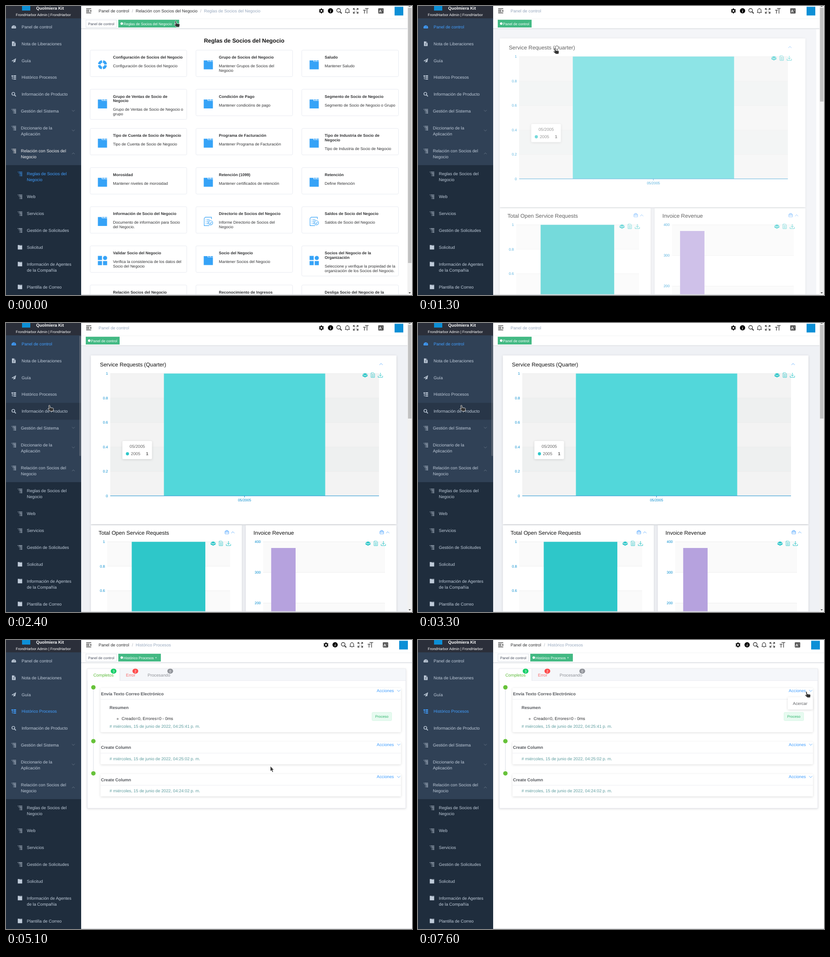
Animation of 886x632 px, one loop 8 s. Source, as an HTML page:

```html
<!DOCTYPE html>
<html lang="es">
<head>
<meta charset="utf-8">
<title>Panel</title>
<style>
html, body { margin: 0; width: 100%; height: 100%; overflow: hidden; background: #fff; }
svg { display: block; width: 886px; height: 632px; }
text { font-family: "Liberation Sans", Arial, sans-serif; text-rendering: geometricPrecision; white-space: pre; }
.item { color: #bfcbd9; }
.item.lit { color: #f4f4f5; }
.item.on { color: #409eff; }
</style>
</head>
<body>
<svg id="stage" viewBox="0 0 886 632" xmlns="http://www.w3.org/2000/svg"></svg>
<script>
const BLUE = '#409eff', SKY = '#36a3f7', AXIS = '#008acd', TEAL = '#2ec7c9';

// y is the optical middle of the line
const text = (x, y, s, fill = '#303133', size = 9.24, extra = '') =>
  `<text x="${x}" y="${y + size * .35}" fill="${fill}" font-size="${size}" ${extra}>${s}</text>`;
const bold = (x, y, s, fill, size) => text(x, y, s, fill, size, 'font-weight="700"');
const mid = (x, y, s, fill, size, extra = '') => text(x, y, s, fill, size, 'text-anchor="middle" ' + extra);
const end = (x, y, s, fill, size) => text(x, y, s, fill, size, 'text-anchor="end"');
const rect = (x, y, w, h, fill, extra = '') =>
  `<rect x="${x}" y="${y}" width="${w}" height="${h}" fill="${fill}" ${extra}/>`;
const circle = (x, y, r, fill, extra = '') => `<circle cx="${x}" cy="${y}" r="${r}" fill="${fill}" ${extra}/>`;
const shape = (d, fill = 'currentColor', extra = '') => `<path d="${d}" fill="${fill}" ${extra}/>`;
const line = (d, stroke = 'currentColor', width = 1) =>
  `<path d="${d}" fill="none" stroke="${stroke}" stroke-width="${width}"/>`;
const at = (x, y, s, extra = '') => `<g transform="translate(${x} ${y})" ${extra}>${s}</g>`;
const group = (id, s) => `<g id="${id}">${s}</g>`;
const chevron = (x, y, up, color = BLUE, w = 3.4) => {
  const h = up ? -w : w;
  return line(`M${x - w} ${y - h / 2}l${w} ${h} ${w} ${-h}`, color, .8);
};

/* ---------- side menu ---------- */
const icons = {
  gauge: shape('M-4.6 3.6A5 5 0 1 1 4.6 3.6Z') + line('M0 2L1.5-2M-3.5 1h1M2.5 1h1M-2.4-2l.7.7', '#304156', .8),
  doc: shape('M-4-5H1L4-2V5H-4Z') + line('M-2 0H2M-2 2.3H2M1-5V-2H4', '#304156', .8),
  plane: shape('M5-5L-5 .6-2.4 1.8 3-3-1 2.4V5L.8 3 3 4Z'),
  tree: shape('M-5-4.5h3.5v2.2H-5ZM-.5-4.5H5v2.2H-.5ZM0-1H5V1H0ZM0 2.5H5v2H0Z') + line('M-3.4-3V3.5H0M-3.4 0H0', undefined, .9),
  search: circle(-1, -1, 3.1, 'none', 'stroke="currentColor" stroke-width="1.4"') + line('M1.2 1.2L4.6 4.6', undefined, 1.7),
  nest: line('M-2.8-4H5M-1-1.3H5M.8 1.4H5M.8 4.1H5', undefined, 1.2) + line('M-5-4h1.2M-3-1.3h1M-1.2 1.4h1M-1.2 4.1h1', undefined, 1.2),
  folder: shape('M-4.8-4.7h4.2v1.2H4.8V5H-4.8ZM.2-4.7h2v.8h-2ZM2.8-4.7h2v.8h-2Z')
};
const menu = [
  ['gauge', 45.5, 'Panel de control'], ['doc', 82.5, 'Nota de Liberaciones'], ['plane', 119.3, 'Guía'],
  ['tree', 156.2, 'Histórico Procesos'], ['search', 193, 'Información de Producto'],
  ['nest', 230, 'Gestión del Sistema'], ['nest', 267, 'Diccionario de la|Aplicación'],
  ['nest', 317, 'Relación con Socios del|Negocio'],
  ['nest', 367, 'Reglas de Socios del|Negocio'], ['nest', 417, 'Web'], ['nest', 454, 'Servicios'],
  ['nest', 490.7, 'Gestión de Solicitudes'], ['folder', 527.5, 'Solicitud'],
  ['folder', 564.3, 'Información de Agentes|de la Compañía'], ['folder', 614.3, 'Plantilla de Correo']
];
const sidebar = () => {
  let s = rect(0, 0, 164, 632, '#304156') + rect(0, 348, 164, 284, '#1f2d3d') + rect(0, 0, 164, 27, '#2b2f3a')
    + rect(0, 27, 164, 36.9, '#283648', 'id="hover"')
    + rect(35, -8, 18, 18, '#0c8fd6')
    + mid(96, 5, 'Quolmiera Kit', '#fff', 9.24, 'font-weight="700"')
    + mid(81.5, 19.5, 'FrondHarbor Admin | FrondHarbor', '#fff', 7.92);
  menu.forEach(([icon, y, label], i) => {
    const x = i < 5 ? 34 : i < 8 ? 32.5 : 45.5;
    const rows = label.split('|').map((r, k) => text(x, y + k * 13.2, r, 'currentColor')).join('');
    s += `<g class="item">${at(i < 8 ? 17 : 30.5, y, icons[icon])}${rows}</g>`;
  });
  s += chevron(147, 229, 0, '#6f7d8e', 3) + chevron(147, 272, 0, '#6f7d8e', 3) + chevron(147, 322.5, 1, '#6f7d8e', 3);
  return s + rect(160, 28, 3.7, 263, '#909399', 'rx="1.8" fill-opacity=".38" id="sideBar"');
};

/* ---------- header ---------- */
const crumbs = list => list.map(([x, s], i) =>
  text(x, 11, s, i == list.length - 1 ? '#97a8be' : '#303133') + (i ? text(x - 8.3, 11, '/', '#a8adb7') : '')).join('');
const tab = (x, w, s, on, close) =>
  rect(x + .4, 30.4, w - .8, 16.2, on ? '#42b983' : '#fff', `stroke="${on ? '#42b983' : '#d8dce5'}" stroke-width=".8"`)
  + (on ? circle(x + 7.6, 38.5, 2.7, '#fff') : '')
  + text(x + (on ? 11.6 : 5.2), 38.8, s, on ? '#fff' : '#495060', 7.92)
  + (close ? text(close, 38.5, '×', '#fff', 7) : '');
const homeCrumb = [202, 'Panel de control'];
const states = [
  crumbs([homeCrumb, [283, 'Relación con Socios del Negocio'], [432, 'Reglas de Socios del Negocio']])
    + tab(174, 67.5, homeCrumb[1]) + tab(245, 133, 'Reglas de Socios del Negocio', 1, 367),
  crumbs([homeCrumb]) + tab(174, 74, homeCrumb[1], 1),
  crumbs([homeCrumb, [283, 'Histórico Procesos']])
    + tab(174, 67.5, homeCrumb[1]) + tab(245, 93, 'Histórico Procesos', 1, 325.3)
];
const tools = () => {
  const teeth = [0, 1, 2, 3, 4, 5].map(i => `<rect x="-1.4" y="-5.4" width="2.8" height="3" transform="rotate(${i * 60})"/>`).join('');
  return at(688.3, 10.7, teeth + circle(0, 0, 3.1, 'none', 'stroke="#111" stroke-width="2.3"'), 'fill="#111"')
    + circle(708.2, 10.5, 5.7, '#000') + mid(708.2, 10.8, 'i', '#fff', 9, 'font-style="italic" font-weight="700" style="font-family:Liberation Serif,serif"')
    + at(727, 10.7, circle(-1.2, -1.2, 4, 'none', 'stroke="#333" stroke-width="1.4"') + line('M1.8 1.8L5.6 5.6', '#333', 2))
    + at(745, 10.5, line('M-5.2 3.8H5.2M-3.7 3.6V-.8A3.7 3.7 0 0 1 3.7-.8V3.6M0-5.8V-4.4', '#222', 1.1) + shape('M-1.4 4.8h2.8l-1.4 1.3Z', '#222'))
    + at(763.2, 10.6, line('M-5.2-2V-5.2H-2M2-5.2H5.2V-2M5.2 2V5.2H2M-2 5.2H-5.2V2M-5-5L-1.6-1.6M5-5L1.6-1.6M5 5L1.6 1.6M-5 5L-1.6 1.6', '#444', 1.3))
    + at(785.3, 10.6, line('M-2-5H6M2.4-5V6M-6-1.3H0M-3-1.3V6', '#555', 1.5))
    + rect(812.3, 5, 11.8, 11.4, '#555', 'rx="1.3"') + mid(816.8, 11.5, 'A', '#fff', 8.3, 'font-weight="700"') + mid(821.6, 8.6, 'z', '#fff', 4)
    + rect(848, 1.7, 19, 19, '#0c8fd6');
};
const header = () => rect(164, 0, 722, 50, '#fff') + rect(164, 27.6, 722, .8, '#edeff2')
  + rect(164, 48.6, 722, 1.2, '#d9dce2') + rect(164, 49.8, 722, 1.2, '#ececee')
  + line('M175 6.2h11M175 9.3h7M175 12.2h7M175 15.2h11', '#222', 1.2) + shape('M186 8.4v4.6l-2.8-2.3Z', '#222')
  + states.map((s, i) => group('state' + i, s)).join('') + group('tools', tools());

/* ---------- rule cards ---------- */
const cardIcons = {
  folder: shape('M-10-9.5h8.4v2.6H10V10H-10ZM-.6-9.5h4.6v1.7H-.6ZM5-9.5h5v1.7H5Z', SKY),
  ring: circle(0, 0, 7, 'none', `stroke="${SKY}" stroke-width="5.6" stroke-dasharray="8.9 2.1" stroke-dashoffset="-1.05"`),
  report: line('M4-9H-6.5L-9-6.5V9.5H2M7-5V-9H3M-6-3h1M-3.5-3H3M-6 1h1M-3.5 1H0M-6 5h1M-3.5 5H-.5', SKY, 1.1)
    + circle(5, 3.2, 4.6, '#fff', `stroke="${SKY}" stroke-width="1.2"`) + line('M2.8 3.2L4.5 5 7.4 1.8', SKY, 1.1),
  grid: shape('M-10-10h9v9h-9ZM-10 1.2h9v9h-9ZM1.2 1.2h9v9h-9Z', SKY) + circle(5.7, -5.5, 4.5, SKY)
};
const cards = [
  ['Configuración de Socios del Negocio', 'Configuración de Socios del Negocio', 'ring'],
  ['Grupo de Socios del Negocio', 'Mantener Grupos de Socios del|Negocio'],
  ['Saludo', 'Mantener Saludo'],
  ['Grupo de Ventas de Socio de|Negocio', 'Grupo de Ventas de Socio de Negocio o|grupo'],
  ['Condición de Pago', 'Mantener condicións de pago'],
  ['Segmento de Socio de Negocio', 'Segmento de Socio de Negocio o Grupo'],
  ['Tipo de Cuenta de Socio de Negocio', 'Tipo de Cuenta de Socio de Negocio'],
  ['Programa de Facturación', 'Mantener Programa de Facturación'],
  ['Tipo de Industria de Socio de|Negocio', 'Tipo de Industria de Socio de Negocio'],
  ['Morosidad', 'Mantener niveles de morosidad'],
  ['Retención (1099)', 'Mantener certificados de retención'],
  ['Retención', 'Define Retención'],
  ['Información de Socio del Negocio', 'Documento de información para Socio|del Negocio.'],
  ['Directorio de Socios del Negocio', 'Informe Directorio de Socios del|Negocio', 'report'],
  ['Saldos de Socio del Negocio', 'Saldos de Socio del Negocio', 'report'],
  ['Validar Socio del Negocio', 'Verifica la consistencia de los datos del|Socio del Negocio', 'grid'],
  ['Socio del Negocio', 'Mantener Socios del Negocio'],
  ['Socios del Negocio de la|Organización', 'Seleccione y verifique la propiedad de la|organización de los Socios del Negocio.', 'grid'],
  ['Relación Socios del Negocio', ''], ['Reconocimiento de Ingresos', ''], ['Desliga Socio del Negocio de la', '']
];
const rules = () => mid(519.7, 75.5, 'Reglas de Socios del Negocio', '#111', 12.35, 'font-weight="700"')
  + cards.map(([title, note, icon = 'folder'], i) => {
    const heads = title.split('|'), notes = note.split('|');
    const tall = heads.length + notes.length > 3;
    let y = 15.5;
    let s = rect(0, 0, 211, tall ? 66 : 58, '#fff', 'rx="2.6" stroke="#e6e9f0" stroke-width=".9"') + at(27, 32, cardIcons[icon]);
    heads.forEach((h, k) => s += bold(50, y + k * 9.9, h, '#303133', 8.58));
    y += 19 + (heads.length - 1) * 9.9;
    notes.forEach((n, k) => s += text(50, y + k * 9.9, n, '#303133', 8.58));
    return at(183.5 + i % 3 * 231, 96.5 + Math.floor(i / 3) * 85.6, s);
  }).join('');

/* ---------- dashboard ---------- */
const toolbox = (x, y) => at(x, y,
  shape('M-5.5-2L0-4.6 5.5-2 0 .8ZM-5.5-.9L0 1.9 5.5-.9V2.2L0 5-5.5 2.2Z', TEAL)
  + line('M13.2-5H18.5L20.8-3V5H13.2ZM15-1.5h4M15 .8h4M15 3h4', TEAL, .9)
  + line('M33.5-5V2M30.5-.8L33.5 2.2 36.5-.8M28.6 1.5V4.8H38.4V1.5', TEAL, 1));
const panel = (x, y, w, h) => rect(x, y, w, h, '#fff', 'filter="url(#soft)"');
const scale = (x1, x2, y, step, labels, colors) => labels.map((s, i) => {
  const top = y + i * step, last = step * 5 == 267.5 && i == 5;
  return (last ? '' : rect(x1, top, x2 - x1, step, colors[i % 2]) + rect(x1, top - .3, x2 - x1, .6, '#e6e6e6'))
    + end(x1 - 5, top, s, AXIS, 7.92);
}).join('');
const ticks = ['1', '0.8', '0.6', '0.4', '0.2', '0'];
const case_ = (x, y) => line(`M${x - 4} ${y - 2}h8v5.6h-8ZM${x - 2} ${y - 2}v-2h4v2M${x - 4} ${y}h8`, BLUE, .8);
const dash = () => rect(164, 51, 712, 581, '#eff1f5')
  + panel(185.3, 71, 666.7, 369) + panel(185.3, 442.5, 329.2, 200) + panel(523.3, 442.5, 328.7, 200)
  + text(205, 91, 'Service Requests (Quarter)', '#111', 11.88) + chevron(818.5, 90, 1)
  + scale(227.5, 814, 110.5, 53.5, ticks, ['#f3f3f3', '#eef0f0'])
  + rect(344.6, 110.5, 352, 267.5, '#52d7da') + toolbox(783.5, 114)
  + rect(227.5, 377.4, 586.5, 1.2, '#3b9fd4') + rect(520, 378, .9, 3.5, AXIS) + mid(520.5, 387, '05/2005', AXIS, 7.92)
  + rect(254, 258, 64.5, 39.5, '#fff', 'rx="2.6" filter="url(#soft)"')
  + mid(286.5, 270, '05/2005', '#666') + circle(265, 286, 3.4, TEAL) + text(272.5, 286, '2005', '#666') + bold(305.5, 286, '1', '#555')
  + text(202, 459, 'Total Open Service Requests', '#111', 11.88) + case_(482, 457.5) + chevron(495, 458, 1)
  + scale(221, 489, 478.5, 53.5, ticks.slice(0, 3), ['#fafafa', '#fff'])
  + rect(274.4, 478.5, 160.6, 160, TEAL) + toolbox(452, 482)
  + text(540, 459, 'Invoice Revenue', '#111', 11.88) + case_(820, 457.5) + chevron(833, 458, 1)
  + scale(561, 827, 478.5, 67, ['400', '300', '200'], ['#fafafa', '#fff'])
  + rect(578.7, 492, 53.3, 150, '#b6a2de') + toolbox(790, 482);

/* ---------- process history ---------- */
const badge = (x, n, color) => rect(x - 6.3, 62.8, 12.6, 10.6, color, 'rx="5.3"') + mid(x, 68.2, n, '#fff', 7.6);
const entry = (y, h, title, date) =>
  rect(206.3, y, 655.5, h, '#fff', 'rx="2" filter="url(#soft)"') + rect(206.3, y + 24.2, 655.5, .7, '#e4e7ed')
  + circle(190.7, y - 1.5, 4.8, '#67c23a') + bold(207.3, y + 12.5, title, '#55585d')
  + text(809, y + 6, 'Acciones', BLUE) + chevron(857, y + 6, 0)
  + text(226, y + h - 12.2, `# miércoles, 15 de junio de 2022, ${date} p. m.`, '#5f9ea0');
const history = () => rect(177.3, 63, 695.3, 305, '#fff', 'filter="url(#soft)"')
  + rect(177.3, 63, 695.3, 305, '#fff', 'stroke="#dcdfe6" stroke-width=".8"')
  + rect(177.6, 63.4, 694.8, 25.4, '#f5f7fa') + rect(177.3, 88.4, 695.3, .8, '#e4e7ed')
  + rect(177.7, 63.4, 70.5, 26, '#fff') + rect(248, 63.4, .7, 25.5, '#dcdfe6')
  + text(190.7, 77, 'Completos', '#5dbb3a') + text(261.8, 77, 'Error', '#f56c6c') + text(309, 77, 'Procesando', '#909399')
  + badge(234.8, 3, '#13ce66') + badge(282.3, 2, '#ff4949') + badge(358.4, 0, '#909399')
  + rect(190, 104, 1.4, 188, '#e4e7ed')
  + entry(105, 96.3, 'Envía Texto Correo Electrónico', '04:25:41')
  + entry(222.7, 48.8, 'Create Column', '04:25:02') + entry(293.2, 48.8, 'Create Column', '04:24:02')
  + bold(226, 148, 'Resumen', '#55585d') + circle(243.7, 172.6, 1.4, 'none', 'stroke="#303133" stroke-width=".8"')
  + text(252.3, 172, 'Creado=0, Errores=0 - 0ms')
  + rect(798.8, 158.3, 42.8, 18, '#e7faf0', 'rx="2" stroke="#d0f5e0" stroke-width=".8"')
  + mid(820.2, 167.3, 'Proceso', '#2fb56c', 7.92)
  + group('drop', rect(807, 125, 54.5, 27, '#fff', 'rx="2.4" filter="url(#soft)"')
    + shape('M836 125.2l4-4 4 4Z', '#fff') + text(818, 138.5, 'Acercar', '#606266'));

const scrollbar = () => rect(876, 0, 10, 632, '#f1f1f1') + rect(877.3, 4, 7.6, 558, '#c1c1c1', 'id="thumb"')
  + shape('M878.3 1.2h5l-2.5-3Z', '#505050') + shape('M878.5 626h5l-2.5 3Z', '#505050');
const hand = shape('M0 0c1-.4 1.8.2 1.9 1l.6 4 5 .8c1.6.3 2.4 1 2.2 2.4l-.8 4.8h-6c-2-1.6-3.5-3.2-5.2-4.8-.6-1 .3-1.7 1.3-1.4l1.4.7-1.2-6C-1 .8-.6.2 0 0Z', '#333', 'stroke="#fff" stroke-width=".8"');
const arrow = shape('M0 0V11L2.4 8.8 4.2 13 6.1 12.2 4.3 8.1H7.4Z', '#333', 'stroke="#fff" stroke-width=".5"');

document.getElementById('stage').innerHTML =
  `<defs><filter id="soft" x="-10%" y="-15%" width="120%" height="130%"><feDropShadow dx="0" dy="1.2" stdDeviation="2.4" flood-opacity=".14"/></filter></defs>`
  + rect(164, 0, 722, 632, '#fff') + group('rules', rules()) + group('dash', dash()) + group('history', history())
  + rect(164, 630.4, 722, 1.6, '#dfe1e4') + header() + group('scroll', scrollbar()) + sidebar()
  + group('cursor', group('hand', hand) + group('arrow', arrow));

/* ---------- motion ---------- */
const $ = id => document.getElementById(id);
const items = [...document.querySelectorAll('.item')];
const clamp = v => Math.max(0, Math.min(1, v));
const show = (id, on) => $(id).setAttribute('display', on ? 'inline' : 'none');

const path = [
  [0, 369.5, 33], [600, 370, 34], [900, 366, 41], [1100, 366, 41], [1300, 298, 92], [1800, 225, 130],
  [2400, 94, 180], [3300, 94, 180], [3400, 90, 162], [3600, 89.5, 160], [4500, 89.5, 160], [4800, 120, 185],
  [5100, 577, 276], [5500, 533, 347], [5700, 494, 151], [5900, 452, 136], [6200, 620, 124], [6300, 793, 124],
  [6600, 847, 113], [8000, 847, 113]
];
const holds = [[2400, 3300], [3900, 4200], [4200, 4500], [4500, 4800], [4800, 5100], [5100, 5500],
  [5500, 5700], [5700, 5900], [5900, 6200], [6300, 6500], [7300, 7600], [7600, 8000]];

function tick(time) {
  const hold = holds.find(([a, b]) => time >= a && time < b);
  return hold ? hold[0] : Math.floor(time / 100) * 100;
}
function pointer(t) {
  const i = path.findIndex((k, n) => t < path[n + 1][0]);
  const [a, x, y] = path[i], [b, x2, y2] = path[i + 1], p = (t - a) / (b - a);
  return [x + (x2 - x) * p, y + (y2 - y) * p];
}
function page(id, t, enter, leave) {
  const inn = 1 - (1 - clamp((t - enter) / 500)) ** 2.9;
  const out = 1 - (1 - clamp((t - leave) / 400)) ** 1.32;
  const alpha = inn ** 1.65 * (1 - out) ** 3;
  show(id, alpha > 0);
  $(id).setAttribute('opacity', alpha);
  $(id).setAttribute('transform', `translate(${30 * (out + inn - 1)} 0)`);
}
function draw(time) {
  const t = tick(time), state = t < 400 ? 0 : t < 3400 ? 1 : 2;
  const wide = t >= 3800, [x, y] = pointer(t), inSide = x < 164;

  page('rules', t, -500, 400);
  page('dash', t, 1100, 3400);
  page('history', t, 4030, 9000);
  if (t < 4200) show('history', false);

  states.forEach((s, i) => show('state' + i, i == state));
  items.forEach((el, i) => {
    const on = i == [8, 0, 3][state], lit = state == 0 && i == 7;
    el.setAttribute('class', 'item' + (on ? ' on' : lit ? ' lit' : ''));
  });
  $('tools').setAttribute('transform', `translate(${wide ? 10 : 0} 0)`);
  show('scroll', !wide);
  $('thumb').setAttribute('height', t < 1200 ? 558 : 205);

  show('hover', inSide);
  $('hover').setAttribute('y', 27 + Math.floor((y - 27) / 36.9) * 36.9);
  show('sideBar', inSide);

  const open = clamp((t - 6600) / 300);
  show('drop', open > 0);
  $('drop').setAttribute('opacity', open);
  $('drop').setAttribute('transform', `translate(0 ${122 * (1 - open)}) scale(1 ${open})`);

  const pointing = inSide || t < 500 || (t >= 1200 && t < 1500) || t >= 6500;
  show('hand', pointing);
  show('arrow', !pointing);
  $('cursor').setAttribute('transform', `translate(${x} ${y})`);
}
function loop(now) {
  draw(now % 8000);
  requestAnimationFrame(loop);
}
draw(0);
requestAnimationFrame(loop);
</script>
</body>
</html>
```
